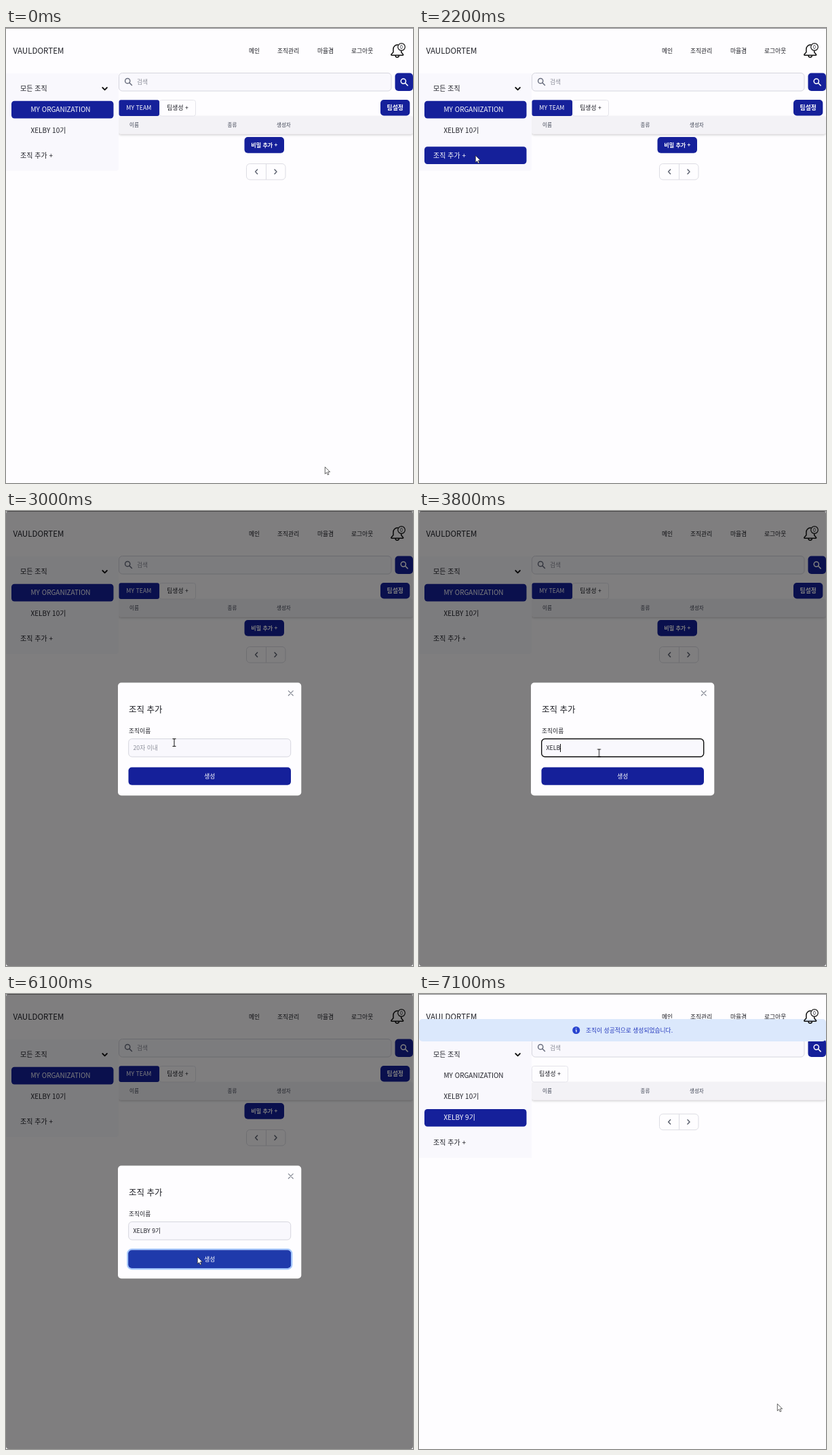
These frames come from a looping animation (600 px wide and 672 px high, 7.3 s). An HTML page:

```html
<!DOCTYPE html>
<html lang="ko">
<head>
<meta charset="utf-8">
<title>조직 추가</title>
<style>
  html, body { margin: 0; width: 100%; height: 100%; overflow: hidden; background: #fefdff; }
  svg { position: absolute; left: 0; top: 0; width: 600px; height: 672px; }
  text, .typed { font: 8.75px "Noto Sans CJK KR", "Noto Sans CJK", "Noto Sans KR", sans-serif; fill: #1c1d24; }
  .side { font-size: 10px; }
  .th { font-size: 7.5px; font-weight: 500; fill: #3c4252; }
  .mid { font-weight: 500; }
  .bold { font-weight: 700; }
  .c { text-anchor: middle; }
  .w { fill: #fff; }
  .hint { fill: #8b8e99; }
  .blue { fill: #15209a; }
  .field { fill: #f9f8fd; stroke: #d6d6de; }
  .card { fill: #fefdff; stroke: #e4e4ea; }
  .line { fill: none; stroke-linecap: round; stroke-linejoin: round; }

  /* every part shares one 7300 ms clock */
  .before, .after, .add-hover, .dialog, .focus, .hint-gone, .make-hover, .ring, .fading,
  .typed, .typed::after, .mouse, .arrow, .beam { animation: 7300ms step-end infinite; }
  .before { animation-name: before; }
  .after { animation-name: after; }
  .add-hover { animation-name: add-hover; }
  .dialog { animation-name: dialog; }
  .focus { animation-name: focus; }
  .hint-gone { animation-name: hint-gone; }
  .make-hover { animation-name: make-hover; }
  .ring { animation-name: ring; }
  .fading { animation-name: fading; }
  .mouse { animation-name: move; }
  .arrow { animation-name: arrow; }
  .beam { animation-name: beam; }

  @keyframes before { 0% { opacity: 1 } 84.93%, to { opacity: 0 } }
  @keyframes after { 0% { opacity: 0 } 84.93%, to { opacity: 1 } }
  @keyframes add-hover { 0% { opacity: 0 } 17.8% { opacity: 1 } 31.5%, to { opacity: 0 } }
  @keyframes dialog { 0% { opacity: 0 } 31.5% { opacity: 1 } 84.93%, to { opacity: 0 } }
  @keyframes focus { 0% { opacity: 0 } 43.83% { opacity: 1 } 82.19%, to { opacity: 0 } }
  @keyframes hint-gone { 0% { opacity: 1 } 45.2%, to { opacity: 0 } }
  @keyframes make-hover { 0% { opacity: 0 } 79.45%, to { opacity: 1 } }
  @keyframes ring { 0% { opacity: 0 } 82.19%, to { opacity: 1 } }
  @keyframes fading { 0% { opacity: 1 } 86.3%, to { opacity: 0 } }
  @keyframes arrow { 0% { opacity: 1 } 41.09% { opacity: 0 } 76.71%, to { opacity: 1 } }
  @keyframes beam { 0% { opacity: 0 } 41.09% { opacity: 1 } 76.71%, to { opacity: 0 } }

  @keyframes move {
    0% { transform: translate(470px, 648px); animation-timing-function: steps(2) }
    2.73% { transform: translate(468px, 655px); animation-timing-function: steps(3) }
    6.84% { transform: translate(432px, 610px); animation-timing-function: steps(4) }
    12.32% { transform: translate(285px, 390px); animation-timing-function: steps(4) }
    17.8% { transform: translate(112px, 196px); animation-timing-function: steps(2) }
    20.54% { transform: translate(83px, 188px) }
    31.5% { transform: translate(83px, 188px); animation-timing-function: steps(2) }
    34.24% { transform: translate(98px, 169px) }
    35.61% { transform: translate(98px, 169px); animation-timing-function: steps(4) }
    41.09% { transform: translate(248px, 342px); animation-timing-function: steps(2) }
    43.83% { transform: translate(265.5px, 357.5px) }
    75.34% { transform: translate(265.5px, 357.5px); animation-timing-function: steps(5) }
    82.19% { transform: translate(282px, 388px) }
    84.93% { transform: translate(462px, 468px); animation-timing-function: steps(4) }
    90.41% { transform: translate(556px, 620px); animation-timing-function: steps(5) }
    97.26%, to { transform: translate(528px, 605px) }
  }

  .typed { position: absolute; left: 187.5px; top: 344px; height: 11.5px; line-height: 11.5px;
           white-space: pre; color: #1c1d24; border-right: 1px solid #111; animation-name: caret; }
  .typed::after { content: ""; animation-name: typing; }
  @keyframes caret {
    0% { opacity: 0; border-color: #111 }
    43.83% { opacity: 1; border-color: #111 }
    71.23% { opacity: 1; border-color: transparent }
    84.93%, to { opacity: 0; border-color: transparent }
  }
  @keyframes typing {
    0% { content: "" }
    45.2% { content: "X" }
    47.94% { content: "XE" }
    50.68% { content: "XEL" }
    52.05% { content: "XELB" }
    54.79% { content: "XELBY" }
    57.53% { content: "XELBY " }
    60.27% { content: "XELBY 9" }
    63.01% { content: "XELBY 9ㄱ" }
    65.75%, to { content: "XELBY 9기" }
  }
</style>
</head>
<body>
<svg viewBox="0 0 600 672">
  <defs>
    <filter id="soft" x="-5%" y="-30%" width="110%" height="180%">
      <feDropShadow dx="0" dy="1.5" stdDeviation="1.5" flood-color="#000" flood-opacity=".2"/>
    </filter>
    <g id="lens" class="line" stroke-width="1.5">
      <circle r="3.6"/><path d="M2.7 2.7L6.3 6.3"/>
    </g>
    <g id="tab">
      <rect class="card" x=".5" y="106.5" width="53" height="23.5" rx="3"/>
      <text class="mid" x="11.3" y="121.3">팀생성 +</text>
    </g>
    <g id="pager">
      <rect class="card" x="354.5" y=".5" width="57.5" height="23.5" rx="5" style="stroke:#dcdce3"/>
      <path d="M383.5 .5v23.5" stroke="#dcdce3"/>
      <path class="line" d="M370.6 9l-3 3.2 3 3.2M396 9l3 3.2-3 3.2" stroke="#5d6270" stroke-width="1.5"/>
    </g>
    <rect id="item" x="8" width="150.5" height="25.7" rx="4.5"/>
  </defs>

  <rect width="600" height="672" fill="#fefdff"/>
  <rect width="600" height="1" fill="#8d8c8f"/>

  <text class="mid" x="10.5" y="38.2" style="font-size:11.6px">VAULDORTEM</text>
  <text x="358" y="37.3">메인</text>
  <text x="400" y="37.3">조직관리</text>
  <text x="459" y="37.3">마율겸</text>
  <text x="509" y="37.3">로그아웃</text>

  <rect class="field" x="166.5" y="66.5" width="401.5" height="26.5" rx="5"/>
  <use href="#lens" x="179.2" y="78.2" stroke="#6b7080"/>
  <text class="hint" x="193" y="83">검색</text>
  <rect class="blue" x="573.5" y="66.5" width="26.5" height="26.5" rx="5"/>
  <use href="#lens" x="585.8" y="78.6" stroke="#fff"/>

  <rect x="166" y="130" width="434" height="26.5" rx="4" fill="#f3f2f6" filter="url(#soft)"/>
  <text class="th" x="182" y="145.7">이름</text>
  <text class="th" x="326.5" y="145.7">종류</text>
  <text class="th" x="399" y="145.7">생성자</text>

  <g class="before">
    <path d="M0 67H166V207a4 4 0 0 1-4 4H0z" fill="#f9f8fd"/>
    <use href="#item" y="107.8" class="blue"/>
    <text class="side w" x="36.5" y="124.2">MY ORGANIZATION</text>
    <text class="side" x="21" y="191.5">조직 추가 +</text>
    <g class="add-hover">
      <use href="#item" y="175.3" class="blue"/>
      <text class="side w" x="21" y="191.5">조직 추가 +</text>
    </g>
    <use href="#tab" x="226"/>
    <rect class="blue" x="166.5" y="106.3" width="59.5" height="23.7" rx="3"/>
    <text class="mid w" x="177.3" y="121.3">MY TEAM</text>
    <rect class="blue" x="552" y="106" width="43.3" height="23.5" rx="5"/>
    <text class="bold c w" x="573.7" y="121">팀설정</text>
    <rect class="blue" x="351.5" y="161" width="58.5" height="23.7" rx="5"/>
    <text class="bold c w" x="380.8" y="176" style="font-size:8.1px">비밀 추가 +</text>
    <use href="#pager" y="200"/>
  </g>

  <g class="after">
    <path d="M0 67H166V242H0z" fill="#f9f8fd"/>
    <use href="#item" y="107.8" class="fading" fill="#f6f5f8"/>
    <text class="side" x="36.5" y="124.2">MY ORGANIZATION</text>
    <use href="#item" y="170" class="blue"/>
    <text class="side w" x="36.5" y="186.4">XELBY 9기</text>
    <text class="side" x="21" y="222.6">조직 추가 +</text>
    <use href="#tab" x="166"/>
    <use href="#pager" y="176.7"/>
    <rect y="37" width="600" height="33" rx="5" fill="#dbe8fc"/>
    <circle cx="231.7" cy="53.5" r="5.5" fill="#2843cf"/>
    <path class="line" d="M231.2 53h.7v3M231.7 50.6v.1" stroke="#fff" stroke-width="1.2"/>
    <text x="246" y="56.7" style="fill:#2438bd">조직이 성공적으로 생성되었습니다.</text>
  </g>

  <text class="side" x="21" y="93.2">모든 조직</text>
  <path class="line" d="M142.3 88l3.3 3.4 3.3-3.4" stroke="#111" stroke-width="1.8"/>
  <text class="side" x="36.5" y="155.4">XELBY 10기</text>

  <g class="line" stroke="#111" stroke-width="1.5">
    <path d="M577.5 24.8c-4 0-6.6 3-6.6 6.6v4.4l-2.9 3.2c-.5.7-.1 1.2.6 1.2h16.2c.8 0 1.2-.6.6-1.2l-2.7-3.2v-2M574 40.6a2.7 2.7 0 0 0 5.4 0"/>
    <circle cx="583" cy="28" r="5.3" stroke-width="1.2" fill="#fefdff"/>
  </g>
  <text class="c" x="583" y="30.6" style="font-size:7px">0</text>

  <g class="dialog">
    <rect width="600" height="672" rx="4" fill="#000" opacity=".5"/>
    <rect x="165" y="253.5" width="270.3" height="166.7" rx="5" fill="#fefdff"/>
    <path class="line" d="M416.4 265.7l6.8 6.8m0-6.8l-6.8 6.8" stroke="#868a95" stroke-width="1.2"/>
    <text x="181" y="298" style="font-size:12.5px">조직 추가</text>
    <text x="181" y="328">조직이름</text>
    <rect class="field" x="180.7" y="336.5" width="239" height="26.5" rx="5"/>
    <rect class="focus" x="180.7" y="336.5" width="239" height="26.5" rx="5" fill="#f9f8fd" stroke="#111" stroke-width="1.4"/>
    <text class="hint hint-gone" x="187.5" y="353">20자 이내</text>
    <rect class="ring" x="179.5" y="377.3" width="241.6" height="28.6" rx="6" fill="none" stroke="#a3c6fb" stroke-width="2.6"/>
    <rect class="blue" x="180.5" y="378.5" width="239.5" height="26.2" rx="5"/>
    <rect class="make-hover" x="180.5" y="378.5" width="239.5" height="26.2" rx="5" fill="#1f3aab"/>
    <text class="mid c w" x="300.3" y="395">생성</text>
  </g>
</svg>

<div class="typed"></div>

<svg viewBox="0 0 600 672">
  <g class="mouse">
    <path class="arrow" d="M.3.3V10.6L2.7 8.4 4.3 12 6 11.2 4.4 7.7H7.6z" fill="#fff" stroke="#222" stroke-width=".7"/>
    <path class="beam" d="M-2.5-5.5H2.5M0-5.5V5.5M-2.5 5.5H2.5" fill="none" stroke="#111"/>
  </g>
</svg>
</body>
</html>
```
